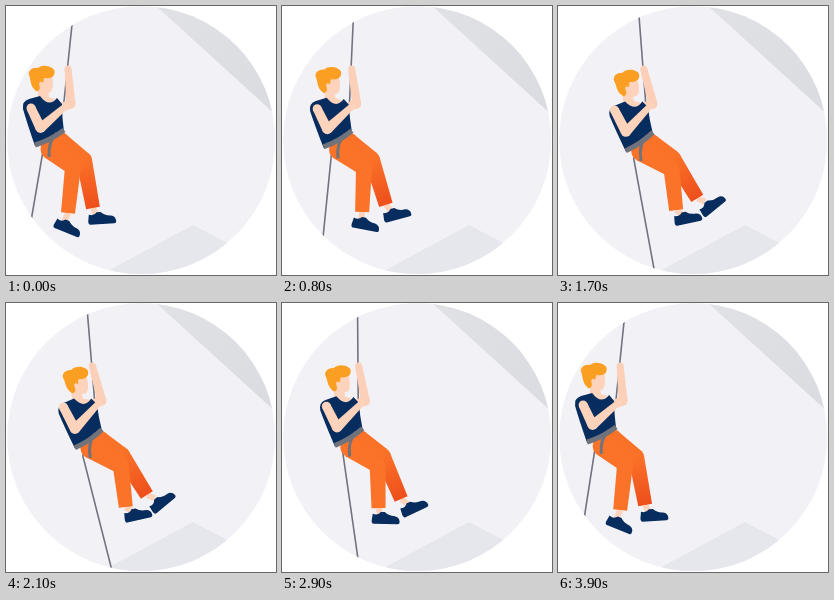
Write an HTML page with a canvas that moves like this. It is 270 by 269 pixels and loops after 4 s.

```html
<!DOCTYPE html>
<html lang="en">
<head>
<meta charset="utf-8">
<title>Swinging climber</title>
<style>
html, body { margin: 0; width: 100%; height: 100%; overflow: hidden; background: #fff; }
canvas { display: block; width: 270px; height: 269px; }
</style>
</head>
<body>
<canvas id="stage" width="270" height="269"></canvas>
<script>
const ctx = document.getElementById('stage').getContext('2d');
const LOOP = 4000;
const PIVOT = [75, -68];
const SKIN = '#fdd3bc', NAVY = '#072c5e', HAIR = '#fb9f22', GREY = '#70727c', ROPE = '#74727f';

// Each joint: x, y at the left end of the swing, then x, y at the right end.
const JOINTS = {
  nearShoulder: [25, 102, 57.5, 104], nearElbow: [34.5, 122, 69, 126], nearHand: [61, 99, 93, 100],
  farShoulder: [50, 103, 83, 102], farElbow: [65, 98, 96, 98], farHand: [62, 63, 86.5, 63],
  nearHip: [45, 143, 85, 145], nearKnee: [67, 161, 115, 163], nearAnkle: [62, 207, 120, 204],
  farHip: [53, 136, 93, 138], farKnee: [78, 154, 116, 152], farAnkle: [87, 202, 141, 192],
  nearShoe: [62, 221, 132, 211], farShoe: [96, 212, 156, 198],
  waist: [45, 131, 84, 135], head: [36, 72, 70.5, 76.5], ropeOut: [37, 145, 77, 153]
};

const mix = (a, b, u) => a + (b - a) * u;

function pose(u) {
  const p = {};
  for (const [name, [x0, y0, x1, y1]] of Object.entries(JOINTS)) {
    p[name] = [mix(x0, x1, u), mix(y0, y1, u)];
  }
  return p;
}

function fillPath(d, color) {
  ctx.fillStyle = color;
  ctx.fill(new Path2D(d));
}

function strokePath(d, color, width) {
  ctx.strokeStyle = color;
  ctx.lineWidth = width;
  ctx.stroke(new Path2D(d));
}

function line(color, width, ...points) {
  strokePath('M' + points.map(p => p.join(' ')).join('L'), color, width);
}

function gradient(x0, y0, x1, y1, from, to) {
  const g = ctx.createLinearGradient(x0, y0, x1, y1);
  g.addColorStop(0, from);
  g.addColorStop(1, to);
  return g;
}

// Tapered limb with round joints; the far end may be cut flat.
function limb(points, widths, color, flatEnd) {
  ctx.fillStyle = color;
  points.forEach(([x, y], i) => {
    const r = widths[i] / 2, next = points[i + 1];
    if (next || !flatEnd) {
      ctx.beginPath();
      ctx.arc(x, y, r, 0, Math.PI * 2);
      ctx.fill();
    }
    if (!next) return;
    const s = widths[i + 1] / 2;
    const len = Math.hypot(next[0] - x, next[1] - y);
    const nx = (y - next[1]) / len, ny = (next[0] - x) / len;
    ctx.beginPath();
    ctx.moveTo(x + nx * r, y + ny * r);
    ctx.lineTo(next[0] + nx * s, next[1] + ny * s);
    ctx.lineTo(next[0] - nx * s, next[1] - ny * s);
    ctx.lineTo(x - nx * r, y - ny * r);
    ctx.fill();
  });
}

function placed([x, y], angle, draw) {
  ctx.save();
  ctx.translate(x, y);
  ctx.rotate(angle);
  draw();
  ctx.restore();
}

function scenery() {
  fillPath('M149-1L265.5 105H270V-1Z', gradient(165, 5, 265, 90, '#e0e1e5', '#dadce1'));
  fillPath('M98 267L187 219L225 239V269H98Z', '#e5e7ec');
}

function shoe(at, angle) {
  placed(at, angle, () =>
    fillPath('M-13-4Q-8-2-5-6L-1-6Q3-2 9-2Q14-1 14 4Q14 6 12 6H-12Q-14 6-14 3Z', NAVY));
}

function leg(hip, knee, ankle, shoeAt, angle, color) {
  line(SKIN, 6, ankle, [mix(ankle[0], shoeAt[0] - 5, .8), mix(ankle[1], shoeAt[1] - 2, .8)]);
  limb([hip, knee, ankle], [21, 16, 14], color, true);
  shoe(shoeAt, angle);
}

function torso() {
  fillPath('M-13-54L-4-52L-2-40L4-38L-3-28L-13-36Z', SKIN);
  fillPath('M-11-41L-22-38Q-29-36-28-28Q-24-14-16 9L13-5Q11-20 11-33L6-39Q-2-29-11-41Z', NAVY);
}

function head() {
  fillPath('M-5-2L10-2Q12 5 10 12Q8 16 3 15L-4 13Z', SKIN);
  fillPath('M-7 12C-12 8-11 1-13-3C-14-7-10-11-4-10C0-14 8-12 10-10Q14-8 12-3Q10 1 2 0L1 5Q-2 2-3 6Q-1 11-4 13Q-6 14-7 12Z', HAIR);
}

function harness() {
  strokePath('M-16 8Q0 3 13-7', GREY, 5);
  strokePath('M6-4Q-3 4-2 20', GREY, 3);
}

function climber(theta) {
  const u = .5 - .53 * Math.cos(theta) + .03 * Math.cos(3 * theta);
  const p = pose(u);
  const lean = -.12 * u;
  const ropeSlope = mix(-.104, .083, u);
  const trail = (2 + 12.5 * Math.cos(theta - 3.5)) * Math.PI / 180;
  const grip = [PIVOT[0] + ropeSlope * 166, 98];
  const tail = [p.ropeOut[0] + 150 * Math.sin(trail), p.ropeOut[1] + 150 * Math.cos(trail)];

  line(ROPE, 1.6, PIVOT, grip, p.ropeOut, tail);
  limb([p.farShoulder, p.farElbow, p.farHand], [9, 9, 7], '#fbcfb8');

  leg(p.farHip, p.farKnee, p.farAnkle, p.farShoe, mix(-.06, -.7, u),
    gradient(...p.farKnee, ...p.farAnkle, '#fa7128', '#ee4f1c'));
  leg(p.nearHip, p.nearKnee, p.nearAnkle, p.nearShoe, mix(.38, -.23, u), '#fa7329');

  placed(p.waist, lean, () => { torso(); harness(); });
  placed(p.head, lean, head);
  limb([p.nearShoulder, p.nearElbow, p.nearHand], [9, 10, 6], SKIN);
}

function frame(now) {
  ctx.fillStyle = '#fff';
  ctx.fillRect(0, 0, 270, 269);
  ctx.save();
  ctx.beginPath();
  ctx.arc(135.2, 134.1, 134, 0, Math.PI * 2);
  ctx.fillStyle = '#f2f1f6';
  ctx.fill();
  ctx.clip();
  scenery();
  climber(now % LOOP / LOOP * Math.PI * 2);
  ctx.restore();
  requestAnimationFrame(frame);
}
frame(performance.now());
</script>
</body>
</html>
```
